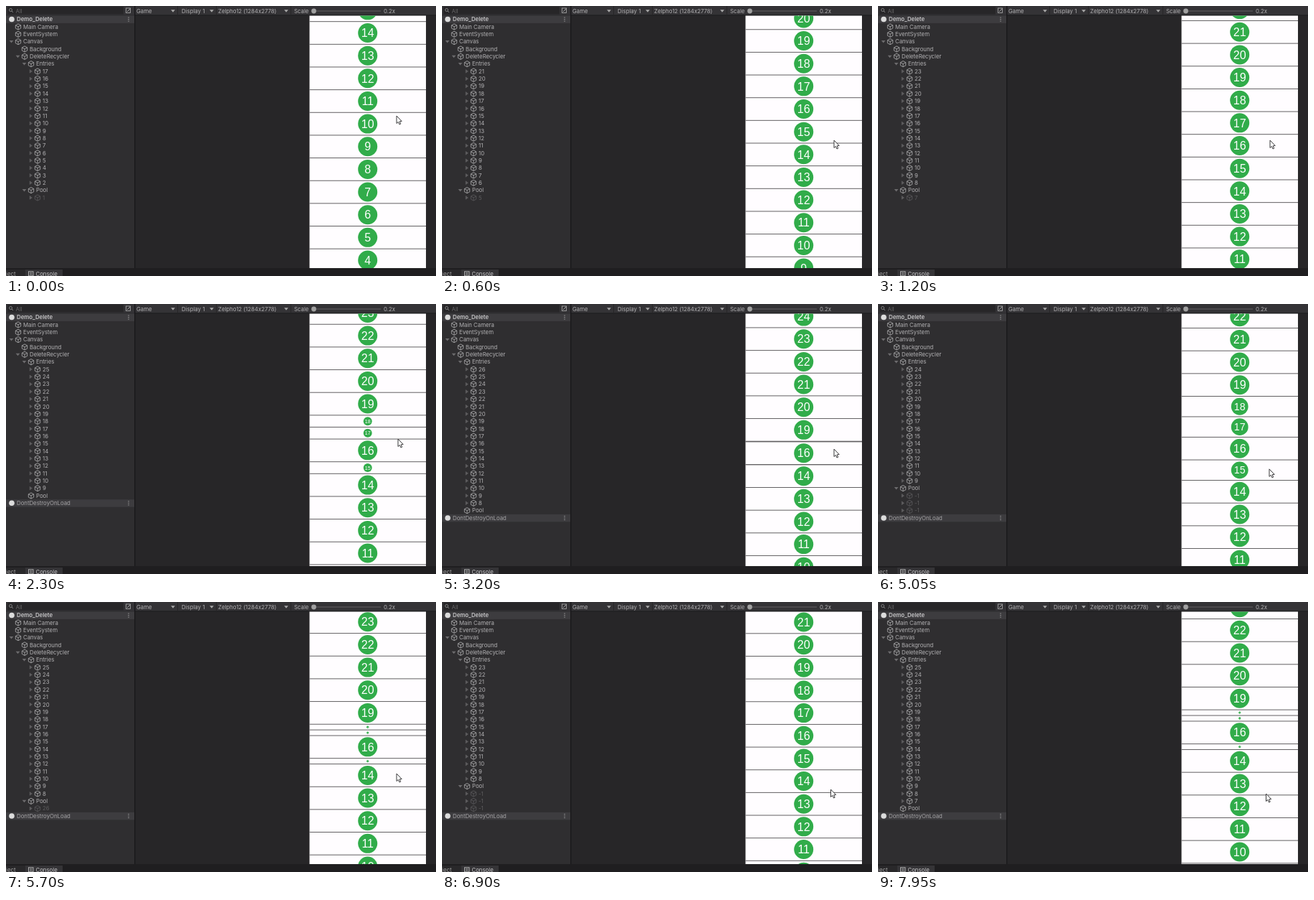
Animation, 600 px wide and 376 px high, one loop 8000 ms. Source, as an HTML page with a canvas:

```html
<!DOCTYPE html>
<html>
<head>
<meta charset="utf-8">
<style>
html, body { margin: 0; overflow: hidden; background: #272628; }
canvas { display: block; }
</style>
</head>
<body>
<canvas id="stage" width="600" height="376"></canvas>
<script>
const g = document.getElementById('stage').getContext('2d');
const ROW = 31.65, PAD = 4.65;
const SHRINK = 1.45, STARTS = [1.9, 4.975, 7.225];
const REMOVED = [15, 17, 18];
const UI = 'Inter, Roboto, sans-serif';
const LIGHT = '#b2b1b3', DIM = '#5c5b5d';

// time, pointer x, pointer y, drag position of the list
const KEYS = [
  [0, 545, 153, 37.5], [.08, 547, 187, 73], [1.95, 547, 187, 271.7],
  [2.3, 547, 188, 274.7], [4.35, 547, 220, 301.9], [5.7, 545, 239, 324.5],
  [6.9, 542.5, 261, 344.5], [7.95, 541.5, 267, 351.9], [8, 541.5, 267, 352]
];

function track(t, col) {
  const i = Math.max(1, KEYS.findIndex(k => k[0] >= t));
  const a = KEYS[i - 1], b = KEYS[i];
  return a[col] + (b[col] - a[col]) * (t - a[0]) / (b[0] - a[0]);
}

// Flick with inertia, then a drag that follows the pointer
function scroll(t) {
  if (t < 1.7) return 37.5 + 242.3 * (1 - Math.exp(-2 * t));
  return t < 1.95 ? 271.7 : track(t, 3);
}

function layout(t) {
  const done = STARTS.filter(s => t >= s + SHRINK).length;
  const start = STARTS[done];
  const shrinking = t > start;
  const small = shrinking ? ROW * (1 - (t - start) / SHRINK) ** 2 : ROW;
  const height = n => REMOVED.includes(n) ? small : ROW;
  const base = scroll(t) - 1.5 * (ROW * done + ROW - small);
  const rows = [];
  for (let n = 14, y = base; n < 30; n++) {
    rows.push({ n, y, h: height(n) });
    y -= (height(n) + height(n + 1)) / 2;
  }
  for (let n = 13; n >= 0; n--) rows.push({ n, y: base + (14 - n) * ROW, h: ROW });
  return { rows, done, shrinking };
}

function rect(x, y, w, h, color) {
  g.fillStyle = color;
  g.fillRect(x, y, w, h);
}

function dot(x, y, r, color) {
  g.fillStyle = color;
  g.beginPath();
  g.arc(x, y, r, 0, 7);
  g.fill();
}

function path(points, stroke, fill, width = .8) {
  g.beginPath();
  points.forEach(p => g.lineTo(...p));
  if (fill) {
    g.closePath();
    g.fillStyle = fill;
    g.fill();
  }
  if (stroke) {
    g.strokeStyle = stroke;
    g.lineWidth = width;
    g.stroke();
  }
}

function text(s, x, y, color = LIGHT, weight = 400) {
  g.font = `${weight} 7.8px ${UI}`;
  g.textAlign = 'left';
  g.textBaseline = 'alphabetic';
  g.fillStyle = color;
  g.fillText(s, x, y + 2.8);
}

function down(x, y, color = '#6c6b6d') {
  path([[x - 2.9, y - 1.5], [x + 2.9, y - 1.5], [x, y + 2]], null, color);
}

function right(x, y) {
  path([[x - 1.7, y - 2.9], [x + 2.4, y], [x - 1.7, y + 2.9]], null, DIM);
}

function cube(x, y, color) {
  path([[x, y - 4], [x + 3.7, y - 2], [x + 3.7, y + 2.2], [x, y + 4.2],
    [x - 3.7, y + 2.2], [x - 3.7, y - 2], [x, y - 4]], color);
  path([[x - 3.7, y - 2], [x, y], [x + 3.7, y - 2]], color);
  path([[x, y], [x, y + 4.2]], color);
}

function menuDots(x, y) {
  for (const d of [-2.5, 0, 2.5]) rect(x - .5, y + d - .5, 1.1, 1.1, '#b0b0b0');
}

function sceneRow(name, y, color, weight) {
  rect(0, y - 5, 179, 10.4, '#3d3c3f');
  dot(8, y, 3.8, '#dcdcdc');
  text(name, 15, y, color, weight);
  menuDots(171, y);
}

function hierarchy(t) {
  // The tree refreshes slightly later than the list
  const { rows, done, shrinking } = layout(Math.max(0, t - .13));
  const seen = rows.filter(r => r.y + r.h / 2 > 17 && r.y - r.h / 2 < 367.6).map(r => r.n);
  const top = Math.max(...seen) + 2, bottom = Math.max(0, Math.min(...seen) - 2);
  const count = top - bottom + 1;
  const pooled = Math.max(0, (done ? 19 : 17) - count);

  let y = 18.5;
  const item = (name, depth, arrow, color = LIGHT) => {
    y += 10.35;
    const x = 17 + depth * 9;
    if (arrow) arrow(x - 9.5, y);
    cube(x, y, color);
    text(name, x + 7, y, color);
  };

  sceneRow('Demo_Delete', y, '#c6c5c7', 600);
  item('Main Camera', 0);
  item('EventSystem', 0);
  item('Canvas', 0, down);
  item('Background', 1);
  item('DeleteRecycler', 1, down);
  item('Entries', 2, down);
  for (let n = top; n >= bottom; n--) item(n, 3, right);
  item('Pool', 2, pooled && down);
  for (let i = 0; i < pooled; i++) {
    const name = !done ? bottom - 1 : shrinking && !i ? top + 1 : -1;
    item(name, 3, right, DIM);
  }
  if (t >= 1.95) sceneRow('DontDestroyOnLoad', y + 10.35, '#a3a2a4', 400);
}

function list(t) {
  g.save();
  g.beginPath();
  g.rect(423.5, 13.5, 162.5, 351.5);
  g.clip();
  rect(423, 13, 164, 353, '#fffdff');
  for (const { n, y, h } of layout(t).rows) {
    if (y < -20 || y > 400) continue;
    rect(423, y + h / 2 - .5, 164, 1, '#626062');
    const r = (h - PAD) / 2;
    if (r <= 0) continue;
    dot(504.7, y, r, '#31ac4a');
    g.save();
    g.translate(504.7, y);
    g.scale(r / 13.5, r / 13.5);
    g.font = '16px "Liberation Sans", Arial, sans-serif';
    g.textAlign = 'center';
    g.fillStyle = '#fff';
    g.fillText(n, 0, 5.7);
    g.restore();
  }
  g.restore();
}

function toolbar() {
  rect(0, 0, 600, 12.5, '#343336');
  rect(180, 12.5, 420, 1, '#1d1c1e');
  rect(2, 1, 162, 10.5, '#272628');
  g.strokeStyle = '#8a898b';
  g.lineWidth = .9;
  g.beginPath();
  g.arc(6.5, 5.5, 2, 0, 7);
  g.stroke();
  path([[8, 7], [10, 9]], '#8a898b', null, .9);
  text('All', 13.5, 6.7, '#666567');
  g.strokeStyle = '#a0a0a0';
  g.strokeRect(167.5, 3, 6, 6.5);
  path([[169, 8], [174, 3]], '#a0a0a0', null, 1);

  text('Game', 182, 6.9);
  text('Display 1', 245, 6.9);
  text('Zelpho12 (1284x2778)', 296, 6.9);
  text('Scale', 402, 6.9);
  text('0.2x', 527, 6.9);
  for (const x of [233, 287, 391]) down(x, 6.8, '#a8a8a8');
  for (const x of [239, 293, 397]) rect(x, 0, 1, 12.5, '#272628');
  rect(427, 6.5, 96, 1, '#626163');
  dot(429.5, 7, 3.4, '#a0a0a0');
}

function footer() {
  rect(0, 365, 600, 11, '#1f1e20');
  rect(0, 367, 27, 9, '#29282a');
  rect(27, 367, 52, 9, '#353437');
  text('ject', 0, 373.2, '#a0a0a0');
  g.strokeStyle = '#bdbdbd';
  g.lineWidth = .9;
  g.strokeRect(31.5, 369.8, 6.5, 6);
  for (const y of [371.8, 373.8]) path([[33, y], [36.5, y]], '#bdbdbd');
  text('Console', 41.5, 373.2, '#c6c5c7');
}

function pointer(t) {
  const x = track(t, 1), y = track(t, 2);
  const shape = [[0, 0], [0, 10.5], [2.4, 8.4], [4, 12], [5.7, 11.2], [4.2, 7.8], [7.2, 7.5], [0, 0]];
  path(shape.map(([dx, dy]) => [x + dx, y + dy]), '#39383a', '#fff', 1);
}

function draw() {
  const t = Math.floor(performance.now() % 8000 / 50) * .05;
  rect(0, 0, 600, 376, '#272628');
  rect(0, 12.5, 179, 352.5, '#2f2e30');
  toolbar();
  rect(179, 0, 1.5, 366, '#1b1a1c');
  hierarchy(t);
  list(t);
  footer();
  pointer(t);
  requestAnimationFrame(draw);
}
draw();
</script>
</body>
</html>
```
